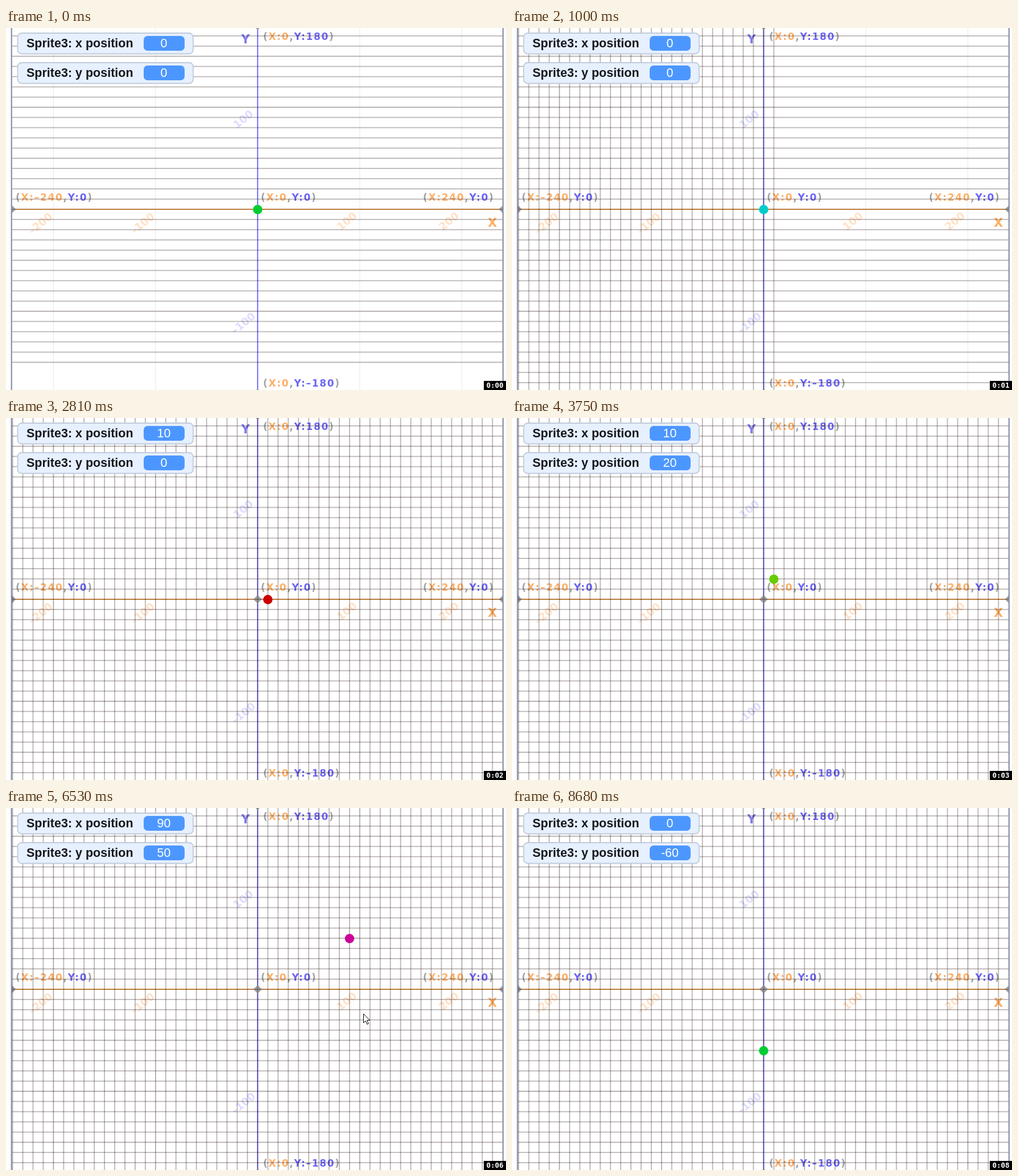
Animation, 879 px wide and 637 px high, one loop 8820 ms. Source, as an HTML page with a canvas:

```html
<!DOCTYPE html>
<html lang="en">
<head>
<meta charset="utf-8">
<title>Coordinate grid</title>
<style>
html, body { margin: 0; width: 100%; height: 100%; overflow: hidden; background: #fff; }
canvas { display: block; }
</style>
</head>
<body>
<canvas id="stage" width="879" height="637"></canvas>
<script>
const ctx = document.getElementById('stage').getContext('2d');
const LOOP = 8820, CX = 442.4, CY = 319, UNIT = 1.795;
const ORANGE = '#ffaf66', BLUE = '#6c66f5', GRAY = '#a3a3a3', PEN = 'rgba(35,10,10,.3)';
const LABEL = 'bold 17px "DejaVu Sans", sans-serif';
const TILTED = 'bold 18.5px "DejaVu Sans", sans-serif';
const AXIS = 'bold 21px "DejaVu Sans", sans-serif';
const ARIAL = '21.5px "Liberation Sans", Arial, sans-serif';

const px = x => CX + x * UNIT;
const py = y => CY - y * UNIT;

// Key points: [time, x, y], joined by straight moves.
const dotPath = [
  [2750, 0, 0], [2810, 10, 0], [3370, 10, 0], [3500, 10, 20],
  [5570, 10, 20], [5980, 90, 20], [6240, 90, 50], [6600, 90, 50], [7240, 0, -60]
];
const cursorPath = [[5300, 129, 180], [5700, 628, 362], [6600, 628, 362], [8010, 830, 590]];

function along(path, t) {
  const next = path.findIndex(key => key[0] > t);
  if (next < 1) return (next ? path.at(-1) : path[0]).slice(1);
  const [t0, x0, y0] = path[next - 1], [t1, x1, y1] = path[next];
  const k = (t - t0) / (t1 - t0);
  return [x0 + (x1 - x0) * k, y0 + (y1 - y0) * k];
}

function line(x1, y1, x2, y2, color, width) {
  ctx.strokeStyle = color;
  ctx.lineWidth = width;
  ctx.beginPath();
  ctx.moveTo(x1, y1);
  ctx.lineTo(x2, y2);
  ctx.stroke();
}
const vertical = (x, color, width) => line(x, 0, x, 637, color, width);
const horizontal = (y, color, width) => line(11, y, 873, y, color, width);

function text(str, x, y, color, font, align = 'left') {
  ctx.font = font;
  ctx.fillStyle = color;
  ctx.textAlign = align;
  ctx.fillText(str, x, y);
}

function fillOrStroke(fill, stroke, width) {
  ctx.fillStyle = fill;
  ctx.fill();
  if (!stroke) return;
  ctx.strokeStyle = stroke;
  ctx.lineWidth = width;
  ctx.stroke();
}

function box(x, y, w, h, fill, stroke) {
  ctx.beginPath();
  ctx.roundRect(x, y, w, h, 7);
  fillOrStroke(fill, stroke, 1.8);
}

function shape(x, y, points, fill, stroke) {
  ctx.beginPath();
  points.forEach(([dx, dy]) => ctx.lineTo(x + dx, y + dy));
  ctx.closePath();
  fillOrStroke(fill, stroke, 1);
}

function coordLabel(x, y, xs, ys) {
  ctx.letterSpacing = '1.7px';
  const parts = [['(', GRAY], ['X:' + xs, ORANGE], [',', GRAY], ['Y:' + ys, BLUE], [')', GRAY]];
  for (const [str, color] of parts) {
    text(str, x, y, color, LABEL);
    x += ctx.measureText(str).width;
  }
  ctx.letterSpacing = '0px';
}

function tiltedLabel(value, x, y, color) {
  ctx.save();
  ctx.translate(x, y);
  ctx.rotate(-0.68);
  text(String(value).replace('-', '–'), 0, 6.5, color, TILTED, 'center');
  ctx.restore();
}

const diamond = (x, y) => shape(x, y, [[0, -7.5], [7.5, 0], [0, 7.5], [-7.5, 0]], '#a0a0a0');

function backdrop() {
  for (const x of [-200, -100, 100, 200]) {
    vertical(px(x), '#ebebeb', 1.2);
    tiltedLabel(x, px(x) - 23, x < 0 ? 344 : 340, '#ffe1c6');
  }
  for (const y of [100, -100]) {
    horizontal(py(y), '#ebebeb', 1.2);
    tiltedLabel(y, 417, py(y) + 21, '#dedcff');
  }
  vertical(CX, '#635cf0', 1.8);
  horizontal(CY, '#ffae55', 1.8);
  for (const x of [10, CX, 874]) diamond(x, CY);
  for (const y of [-4, 642]) diamond(CX, y);

  coordLabel(452, 21, '0', '180');
  coordLabel(17, 304, '–240', '0');
  coordLabel(448, 304, '0', '0');
  coordLabel(733, 304, '240', '0');
  coordLabel(452, 631, '0', '–180');
  text('Y', 421, 27, '#7f7aee', AXIS, 'center');
  text('X', 855, 350, '#fdb066', AXIS, 'center');
}

// The pen adds about 30 lines a second, first the rows, then the columns.
function penLines(t) {
  const tick = 34 + Math.floor((t - 34) / 138) * 138;
  const count = 33 + Math.floor(Math.max(0, tick - 30) * 0.0308);
  for (let i = 0; i < Math.min(count, 36); i++) horizontal(py(170 - 10 * i), PEN, 1.8);
  for (let i = 0; i < Math.min(count - 36, 48); i++) vertical(px(10 * i - 240), PEN, 1.8);
}

function monitor(y, axis, value) {
  box(20.5, y, 308.5, 36.5, '#e6f0ff', '#c0cbdb');
  text(`Sprite3: ${axis} position`, 36, y + 25, '#17181c', 'bold ' + ARIAL);
  box(242, y + 5, 72, 26, '#4c97ff');
  text(value, 277.5, y + 25, '#fff', ARIAL, 'center');
}

function draw(t) {
  ctx.fillStyle = '#fff';
  ctx.fillRect(0, 0, 879, 637);

  ctx.save();
  ctx.beginPath();
  ctx.rect(10, 0, 864, 637);
  ctx.clip();
  backdrop();
  penLines(t);
  ctx.restore();
  vertical(9.7, '#8590a8', 2.2);
  vertical(873.8, '#8590a8', 2.2);

  const [x, y] = along(dotPath, t).map(v => Math.round(v / 10) * 10);
  const hue = 135 + 45 * Math.floor((t + 55) / 535);
  ctx.beginPath();
  ctx.arc(px(x), py(y) + 0.5, 8.2, 0, 2 * Math.PI);
  fillOrStroke(`hsl(${hue % 360}, 100%, 40%)`);

  monitor(9, 'x', x);
  monitor(61, 'y', y);

  if (t >= 5300 && t < 8010) {
    const [mx, my] = along(cursorPath, t);
    const arrow = [[0, 0], [0, 16], [3.7, 12.6], [6.3, 18.6], [8.8, 17.5], [6.2, 11.6], [11, 11.5]];
    shape(mx + 0.5, my, arrow, '#fff', '#000');
  }

  ctx.fillStyle = '#000';
  ctx.fillRect(840, 621, 39, 16);
  const seconds = Math.min(8, Math.floor(t / 970));
  text('0:0' + seconds, 859.5, 633, '#fff', 'bold 12.5px "DejaVu Sans Mono", monospace', 'center');
}

function frame() {
  draw(performance.now() % LOOP);
  requestAnimationFrame(frame);
}
frame();
</script>
</body>
</html>
```
